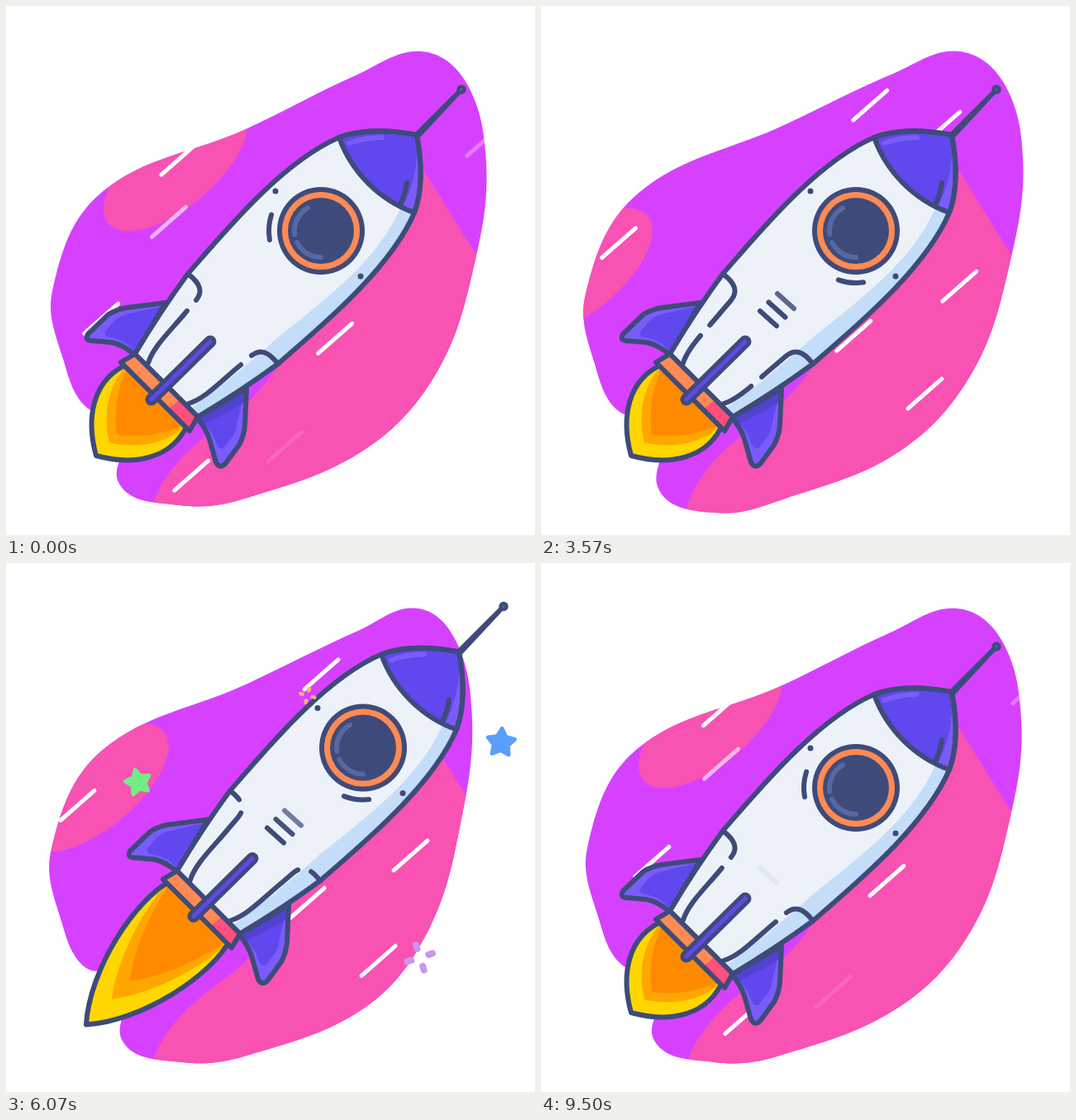
Animation, 640 px wide and 640 px high, one loop 9570 ms. Source, as an HTML page with a canvas:

```html
<!DOCTYPE html>
<html lang="en">
<head>
<meta charset="utf-8">
<title>Rocket</title>
<style>
html, body { margin: 0; width: 100%; height: 100%; overflow: hidden; background: #fff; }
canvas { display: block; width: 640px; height: 640px; }
</style>
</head>
<body>
<canvas width="640" height="640"></canvas>
<script>
const ctx = document.querySelector('canvas').getContext('2d');
const LOOP = 9570, TRIP = LOOP / 2, GUST = LOOP / 4;
const INK = '#3e4b7a', INDIGO = '#6147ee', VIOLET = '#7a5cfa', ORANGE = '#ff8a54', PINK = '#f852b3';

const rad = deg => deg * Math.PI / 180;
const clamp = v => Math.max(0, Math.min(1, v));
const mix = (a, b, u) => a + (b - a) * u;
// Eased step from 0 to 1.
const ramp = (t, from, to) => (1 - Math.cos(Math.PI * clamp((t - from) / (to - from)))) / 2;
// Soft pulse once per loop.
const swell = (t, peak) => Math.max(0, Math.cos(2 * Math.PI * (t - peak) / LOOP)) ** 4;

function fill(path, color) {
  ctx.fillStyle = color;
  ctx.fill(new Path2D(path));
}
function stroke(path, color = INK, width = 6) {
  ctx.strokeStyle = color;
  ctx.lineWidth = width;
  ctx.stroke(new Path2D(path));
}
function disc(x, y, r, color) {
  ctx.fillStyle = color;
  ctx.beginPath();
  ctx.arc(x, y, r, 0, 7);
  ctx.fill();
}
function arc(r, from, to, color) {
  ctx.strokeStyle = color;
  ctx.lineWidth = 6;
  ctx.beginPath();
  ctx.arc(381, 272, r, rad(from), rad(to));
  ctx.stroke();
}
// Runs a drawing twice: as is and reflected in the rocket's axis.
function bothSides(draw) {
  draw();
  ctx.save();
  ctx.transform(0, -1, -1, 0, 653, 653);
  draw();
  ctx.restore();
}

// ---- background ----
const ROUND = [[503, 55], [557, 93], [581, 190], [569, 302], [523, 440], [435, 536], [285, 597], [210, 604],
  [137, 578], [150, 500], [98, 486], [70, 430], [56, 345], [115, 226], [290, 149], [425, 83]];
const EGG = [[515, 53], [575, 88], [597, 160], [571, 303], [524, 446], [435, 551], [335, 591], [245, 603],
  [185, 588], [150, 500], [78, 525], [42, 485], [38, 385], [122, 240], [320, 112], [455, 64]];

// Smooth closed curve; handles follow the neighbours and scale with each segment.
function smooth(points) {
  const n = points.length, at = i => points[(i + n) % n];
  const handle = (i, length) => {
    const [x0, y0] = at(i - 1), [x1, y1] = at(i + 1), [x, y] = at(i);
    const k = length * .36 / Math.hypot(x1 - x0, y1 - y0);
    return [x + (x1 - x0) * k, y + (y1 - y0) * k];
  };
  return points.reduce((d, [x, y], i) => {
    const [ex, ey] = at(i + 1), length = Math.hypot(ex - x, ey - y);
    return `${d}C${handle(i, length)} ${handle(i + 1, -length)} ${ex} ${ey}`;
  }, `M${points[0]}`);
}

function drawBlob(t) {
  const egg = (1 - Math.cos(6 * Math.PI * t / LOOP)) / 2;
  const dent = swell(t, 6070), sag = swell(t, 3300);
  ctx.save();
  ctx.clip(new Path2D(smooth(ROUND.map(([rx, ry], i) => {
    const x = mix(rx, EGG[i][0], egg), y = mix(ry, EGG[i][1], egg);
    return [
      x - dent * .14 * Math.max(0, x - 450),
      y + sag * 10 * clamp((300 - x) / 80) * clamp((y - 540) / 50)
    ];
  }))));
  ctx.fillStyle = '#d641ff';
  ctx.fillRect(0, 0, 640, 640);
  fill('M500 190L575 311L640 640H170C174 580 212 541 258 508C290 486 310 462 330 435Z', PINK);
  const drift = 1 - ramp(t, 0, 3300) + ramp(t, 4300, 8400);
  ctx.fillStyle = PINK;
  ctx.beginPath();
  ctx.ellipse(mix(48, 205, drift), mix(322, 195, drift), 106, 48, rad(-40), 0, 7);
  ctx.fill();
  ctx.restore();
}

// ---- speed lines: x, y, speed, opacity ----
const LATE = [[188, 204, .45], [177, 279, 1.08, .6], [95, 396], [378, 420, 1.05],
  [317, 551, .87, .12], [204, 586], [558, 181, .68, .3]];
const EARLY = [[378, 138], [466, 164], [486, 357], [444, 487, .82], [358, 417, .82]];

function drawLines(lines, shift) {
  for (const [x, y, speed = 1, alpha = 1] of lines) {
    ctx.globalAlpha = alpha;
    const dx = shift * speed;
    stroke(`M${x + dx} ${y - dx * .88}l41 -36`, '#fff', 5);
  }
  ctx.globalAlpha = 1;
}
function drawGust(t) {
  const phase = t % GUST;
  const late = phase > 1800 ? phase - GUST : phase, early = phase - 1177;
  drawLines(LATE, 4.6e-5 * late ** 2 - .27 * late + 450 * Math.exp(-(late + 592) / 60));
  drawLines(EARLY, -.15 * early - 5e-7 * early ** 3);
}

// ---- stars and bursts ----
function star(color) {
  ctx.beginPath();
  for (let i = 0; i < 10; i++) {
    const r = i % 2 ? 9 : 17, a = rad(i * 36 - 90);
    ctx.lineTo(r * Math.cos(a), r * Math.sin(a));
  }
  ctx.closePath();
  ctx.fillStyle = ctx.strokeStyle = color;
  ctx.lineWidth = 5;
  ctx.fill();
  ctx.stroke();
}
function burst(color) {
  for (let i = 0; i < 4; i++) {
    ctx.rotate(Math.PI / 2);
    stroke('M11 0H16', color, 8);
  }
}
// Each bit passes (x, y) at full boost and shrinks away at its end time.
const BOOST = 1285;
const BITS = [
  { draw: star, color: '#5a9eff', x: 599, y: 217, vx: -.02, vy: .4, turn: 4, size: 1, end: 2300 },
  { draw: star, color: '#74ec86', x: 160, y: 265, vx: -.15, vy: .22, turn: -14, size: .92, end: 1800 },
  { draw: burst, color: '#c896f2', x: 501, y: 477, vx: -.2, vy: .22, turn: -18, size: 1, end: 2000 },
  { draw: burst, color: '#ffb078', x: 365, y: 160, vx: -.277, vy: .32, turn: 15, size: .55, end: 2400 }
];
function drawBits(p) {
  for (const { draw, color, x, y, vx, vy, turn, size, end } of BITS) {
    const age = p - BOOST;
    const scale = size * (ramp(p, 300, 900) - ramp(p, end - 200, end));
    if (scale <= 0) continue;
    ctx.save();
    ctx.translate(x + vx * age, y + vy * age);
    ctx.rotate(rad(turn + age * .05));
    ctx.scale(scale, scale);
    draw(color);
    ctx.restore();
  }
}

// ---- rocket ----
const BODY = 'M497 156C465 150 430 149 403 159C333 189 263 275 220 324C195 358 172 394 156 421'
  + 'L232 497C259 481 295 458 329 433C378 390 464 320 494 250C504 223 503 188 497 156Z';
const NOSE = 'M497 156C465 150 430 149 403 159C418 201 452 235 494 250C504 223 503 188 497 156Z';
const LEFT_FIN = 'M193 359L146 365Q134 367 124 373L99 397Q95 405 104 405L128 407Q142 410 156 422Z';
const RIGHT_FIN = 'M291 463L289 507Q288 520 282 531L266 553Q259 561 254 552L247 527Q243 512 231 498Z';
const COLLAR = 'M139 431L156 421L232 497L222 514Z';
const PANEL = 'M220 324C236 336 238 346 230 356L218 370C200 392 178 412 172 432';

function flamePath(power, rest, boost) {
  const [a, b, c, d, x, y] = rest.map((v, i) => mix(v, boost[i], power));
  return `M150 432C${a} ${b} ${c} ${d} ${x} ${y}C${653 - d} ${653 - c} ${653 - b} ${653 - a} 221 503Z`;
}
function drawFlame(p) {
  const power = ramp(p, 350, 1200) - ramp(p, 1330, 2400);
  const outer = flamePath(power, [103, 451, 97, 500, 109, 544], [105, 455, 50, 540, 46, 607]);
  fill(outer, '#ffd600');
  fill(flamePath(power, [120, 458, 118, 500, 125, 528], [118, 458, 82, 530, 77, 576]), '#ffa600');
  fill(flamePath(power, [134, 458, 130, 495, 134, 519], [130, 460, 102, 515, 99, 554]), '#ff8a00');
  stroke(outer);
}

function drawFins() {
  fill(LEFT_FIN, VIOLET);
  fill('M193 362L150 372Q138 374 130 382L120 394Q118 400 126 401Q145 404 158 420Z', INDIGO);
  fill(RIGHT_FIN, VIOLET);
  fill('M290 463L280 503Q279 515 272 524L263 535Q257 537 254 528Q249 511 231 498Z', INDIGO);
  fill('M291 463L290 478Q264 495 240 505L232 498Z', '#5242d2');
  stroke(LEFT_FIN);
  stroke(RIGHT_FIN);
}

function drawHull() {
  fill(BODY, '#edf2f9');
  ctx.save();
  ctx.clip(new Path2D(BODY));
  fill('M479 240C455 300 400 345 330 400C290 436 255 465 222 488L235 505L520 330V240Z', '#c4ddf8');
  fill(NOSE, INDIGO);
  fill('M497 156C499 190 494 215 479 245L520 260V156Z', VIOLET);
  ctx.restore();
  stroke('M415 166Q434 159 455 159', VIOLET);
  stroke('M485 214Q483 228 477 240');
  stroke(NOSE);
  stroke(BODY);
  fill('M493 155L549 99L553 103L500 160Z', INK);
  disc(551, 101, 5.7, INK);
  disc(551, 101, 1.5, '#5767a3');
  bothSides(() => disc(326, 224, 3.5, INK));
}

function drawWindow(t, p) {
  disc(381, 272, 53, INK);
  disc(381, 272, 47, ORANGE);
  disc(381, 272, 40, INK);
  const spin = -360 * ramp(p, 1150, 3500) ** 2;
  arc(32, 172 + spin, 240 + spin, '#5767a3');
  arc(32, 90 + spin, 154 + spin, '#5767a3');
  const mark = 132 + 52 * Math.cos(2 * Math.PI * t / LOOP);
  arc(63, mark - 14, mark + 14, INK);
}

function drawDashes(t) {
  const phase = t % GUST;
  for (let i = 0; i < 3; i++) {
    ctx.globalAlpha = clamp((phase - 100 - 150 * i) / 350) * clamp((2370 - 220 * i - phase) / 900);
    stroke(`M${265 + 10.5 * i} ${369 - 10.5 * i}l20 18`);
  }
  ctx.globalAlpha = 1;
}

function drawPanels(p) {
  const gap = 47 - 23 * ramp(p, 0, BOOST) + 95 * ramp(p, BOOST, 2500) - 72 * ramp(p, 2500, TRIP);
  ctx.setLineDash([gap - 8.5, 17, 200, 0]);
  bothSides(() => stroke(PANEL));
  ctx.setLineDash([]);
}

function drawRocket(t, p) {
  const lift = ramp(p, 350, 1200) - ramp(p, 1757, 2922);
  ctx.save();
  ctx.translate(51 * lift, -48.5 * lift);
  drawFlame(p);
  drawFins();
  drawHull();
  drawWindow(t, p);
  drawDashes(t);
  drawPanels(p);
  fill(COLLAR, ORANGE);
  fill('M196 488L211 476L232 497L222 514Z', '#ff4f7d');
  stroke(COLLAR);
  stroke('M247 406L176 476', INK, 15);
  stroke('M247 406L176 476', INDIGO, 5);
  ctx.restore();
}

function frame(now) {
  const t = now % LOOP, p = t % TRIP;
  ctx.clearRect(0, 0, 640, 640);
  ctx.lineCap = ctx.lineJoin = 'round';
  drawBlob(t);
  drawGust(t);
  drawRocket(t, p);
  drawBits(p);
  requestAnimationFrame(frame);
}
requestAnimationFrame(frame);
</script>
</body>
</html>
```
